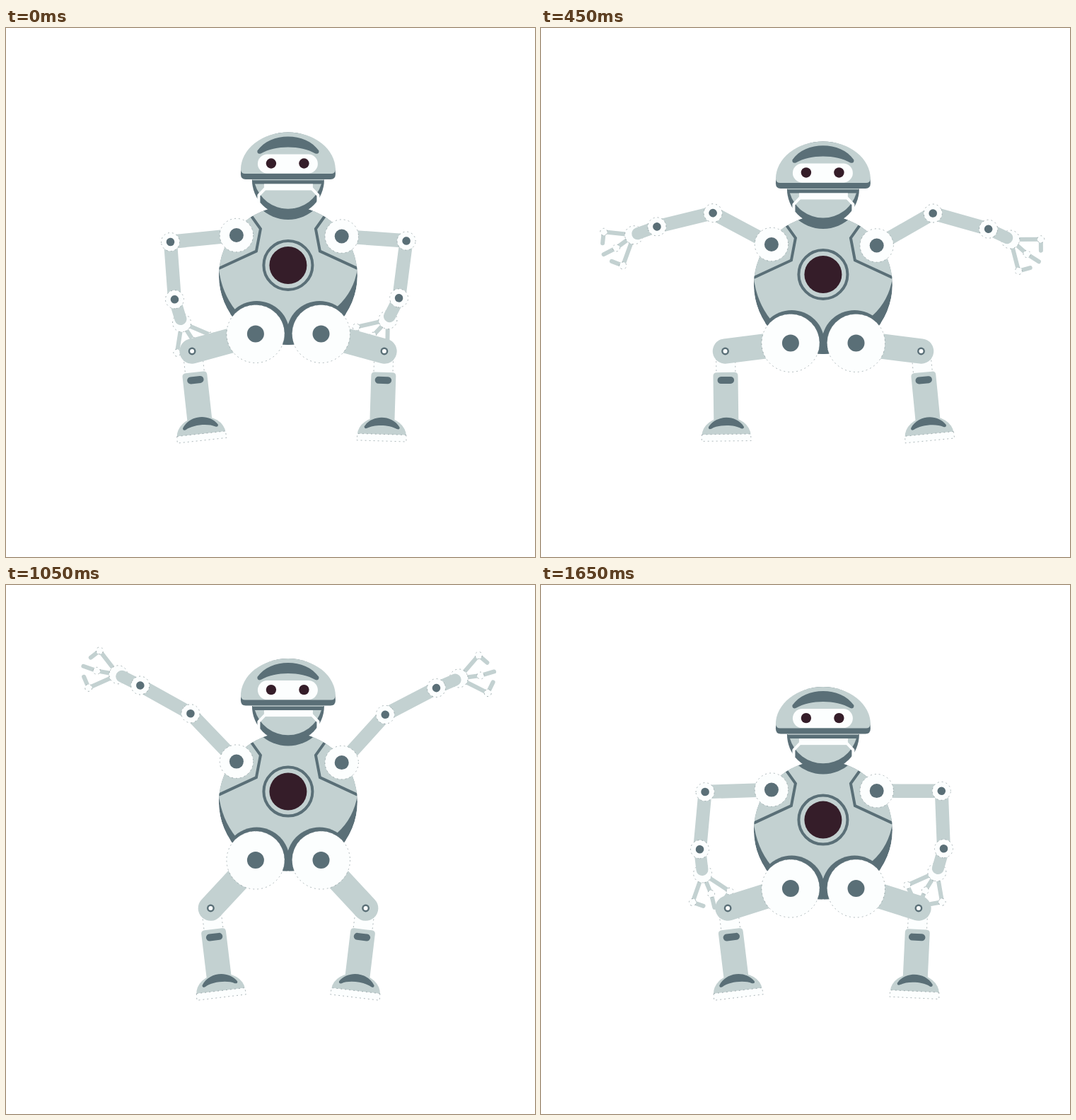
These frames come from a looping animation (748 by 748 pixels, 1.7 s). An HTML page:

```html
<!DOCTYPE html>
<html lang="en">
<head>
<meta charset="utf-8">
<title>Robot jumping jack</title>
<style>
  html, body { margin: 0; width: 100%; height: 100%; overflow: hidden; background: #fff; }
  svg { display: block; width: 100vw; height: 100vh; }
  .light { fill: #c3d1d1; }
  .dark { fill: #5a6f77; }
  .core { fill: #351d29; }
  .white { fill: #fcfefe; }
  .rim { stroke: #7d8d91; stroke-width: .6; stroke-dasharray: 2 4; }
  .limb { stroke: #c3d1d1; fill: none; stroke-linecap: round; }
  .seam { stroke: #5a6f77; fill: none; stroke-width: 4; }
  .mask { stroke: #fcfefe; fill: none; stroke-width: 4; stroke-linejoin: round; }
</style>
</head>
<body>
<svg id="stage" viewBox="0 0 748 748"></svg>
<script>
const LOOP = 1700, STEP = 50, TOP = 875;
const FORE = 81.5, THIGH = 92.7, HIP_X = 352.5, KNEE_Y = 457;

// Both sides are built as left limbs; the second one is mirrored about x = 399.
const sides = [
  { id: 'l', x: 326, dy: -42.5, upper: 94, arm: [174.2, 240.2], fore: [85.8, 242.4], hand: [73, 242],
    foot: [[0, 275.5], [475, 261.2], [650, 284.3], [TOP, 309.5], [1250, 295.5], [LOOP, 275.5]] },
  { id: 'r', x: 323.2, dy: -41, upper: 91.5, arm: [175.9, 241.8], fore: [82.6, 241.2], hand: [63, 241],
    foot: [[0, 266.5], [475, 248.6], [650, 278.5], [TOP, 311.5], [1250, 293], [LOOP, 266.5]] }
];
const bodyKeys = [[0, 335.5], [200, 342], [475, 349.1], [TOP, 280.8], [1250, 305], [LOOP, 335.5]];

const dot = (x, y, r, cls) => `<circle cx="${x}" cy="${y}" r="${r}" class="${cls}"/>`;
const bar = (len, w) => `<path class="limb" d="M0 0H${len}" stroke-width="${w}"/>`;
const joint = (x, y, r, hub) => dot(x, y, r, 'white rim') + dot(x, y, hub, 'dark');
const flip = (id, body) => id === 'r' ? `<g transform="translate(798) scale(-1 1)">${body}</g>` : body;

const finger = (angle, len, bend, tip) => `
  <g transform="rotate(${angle})">${bar(len, 6)}
    <g transform="translate(${len}) rotate(${bend})">${bar(tip, 6)}</g>
    ${dot(len, 0, 5, 'white rim')}
  </g>`;

const arm = s => flip(s.id, `
  <g id="arm-${s.id}">${bar(s.upper, 19.5)}
    <g id="fore-${s.id}">${bar(FORE, 19)}
      <g id="hand-${s.id}">
        <g transform="translate(34.5)">
          ${finger(-50, 46, 91, 17)}${finger(-16, 31, 9, 20)}${finger(26, 43, -90, 16)}
          ${dot(0, 0, 13, 'white rim')}
        </g>
        ${bar(29, 17)}
      </g>
      ${joint(FORE, 0, 13, 5.8)}
    </g>
    ${joint(s.upper, 0, 13, 5.8)}
  </g>`);

const leg = s => flip(s.id, `
  <g id="shin-${s.id}">
    <rect class="white rim" x="-13" y="12" width="27" height="20"/>
    <path class="light" d="M-17.5 100V35q0-5 5-5h25q5 0 5 5v65z"/>
    <rect class="dark" x="-11.5" y="36" width="23.5" height="10" rx="5"/>
    <path class="light" d="M-34.5 119A34.5 26 0 0 1 34.5 119z"/>
    <path class="dark" d="M-25 107C-14 89.5 14 89.5 25 107Q25.5 111 21 109.5C11 103.5-11 103.5-21 109.5Q-25.5 111-25 107z"/>
    <path class="white rim" d="M-34.5 117.5H34.5L35 127H-35z"/>
  </g>
  <g id="thigh-${s.id}">${bar(THIGH, 35.5)}</g>
  <g id="knee-${s.id}">${dot(0, 0, 5.4, 'dark')}${dot(0, 0, 3, 'white')}</g>`);

const torso = `
  <clipPath id="hull"><circle cy="14.5" r="98"/></clipPath>
  <g clip-path="url(#hull)">
    ${dot(0, 14.5, 98, 'dark')}
    <path class="light" d="M-98 5Q-94 39-74 64L0 86 70 58Q93 37 98 5V-90H-98z"/>
    ${dot(-44.5, 97, 46.5, 'dark')}${dot(44.5, 97, 46.5, 'dark')}
    ${dot(0, -120.5, 56, 'dark')}
    <path class="seam" d="M-54-72.500L-39-51.500-45-20-98 4.500M54-72.500L39-51.500 45-20 98 4.500"/>
  </g>
  <circle r="34.5" class="seam"/>
  ${dot(0, 0, 26.5, 'core')}
  ${joint(-46, 97, 41, 12)}${joint(46.6, 97, 41, 12)}
  ${joint(-73, -42.5, 23.7, 10)}${joint(75.8, -41, 23.7, 10)}`;

const head = `
  <path class="dark" d="M-51-121A51 51 0 0 0 51-121z"/>
  <path class="light" d="M-50-121.5H50V-120.3H-50z"/>
  <path class="light" d="M-47-115A49 49 0 0 0 47-115z"/>
  <path class="mask" d="M-41.5-89V-99L-32-109H33L42.5-99V-89"/>
  <rect class="white" x="-34" y="-115" width="69" height="9"/>
  <path class="dark" d="M-67-129A67 59 0 0 1 67-129Q67-121.5 60-121.5H-60Q-67-121.5-67-129z"/>
  <path class="light" d="M-67-135A67 53 0 0 1 67-135Q66-129.5 61-129.5H-61Q-66-129.5-67-135z"/>
  <path class="dark" d="M-43.5-162C-25-188.8 25-188.8 43.5-162Q44-156.500 38.500-158C18-170 -18-170-38.500-158Q-44-156.500-43.500-162z"/>
  <rect class="white" x="-43" y="-157" width="85" height="27" rx="13.5"/>
  ${dot(-24, -144, 7.2, 'core')}${dot(22.5, -144, 7.2, 'core')}`;

document.getElementById('stage').innerHTML =
  sides.map(arm).join('') + sides.map(leg).join('') + `<g id="body">${torso}${head}</g>`;

function track(keys, t) {
  const i = keys.findIndex(k => k[0] > t);
  const [t0, a] = keys[i - 1], [t1, b] = keys[i];
  return a + (b - a) * (t - t0) / (t1 - t0);
}

const pose = (id, x, y, deg) =>
  document.getElementById(id).setAttribute('transform', `translate(${x} ${y}) rotate(${deg})`);
const degrees = (y, x) => Math.atan2(y, x) * 180 / Math.PI;

function draw(t) {
  const y = track(bodyKeys, t);
  const lift = t < TOP ? t / TOP : (LOOP - t) / (LOOP - TOP);
  pose('body', 398.9, y, 0);
  for (const s of sides) {
    const [a, f, h] = [s.arm, s.fore, s.hand].map(([from, to]) => from + (to - from) * lift);
    pose('arm-' + s.id, s.x, y + s.dy, a);
    pose('fore-' + s.id, s.upper, 0, f - a);
    pose('hand-' + s.id, FORE, 0, h - f);

    // The knee slides along a fixed height at thigh length from the hip.
    const drop = KNEE_Y - (y + 97);
    const reach = Math.sqrt(THIGH * THIGH - drop * drop);
    const kneeX = HIP_X - reach;
    pose('thigh-' + s.id, kneeX, KNEE_Y, degrees(-drop, reach));
    pose('knee-' + s.id, kneeX, KNEE_Y, 0);
    pose('shin-' + s.id, kneeX, KNEE_Y, -degrees(track(s.foot, t) - kneeX, 112));
  }
}

const start = performance.now();
function tick() {
  const t = (performance.now() - start) % LOOP;
  draw(Math.floor(t / STEP) * STEP);
  requestAnimationFrame(tick);
}
tick();
</script>
</body>
</html>
```
